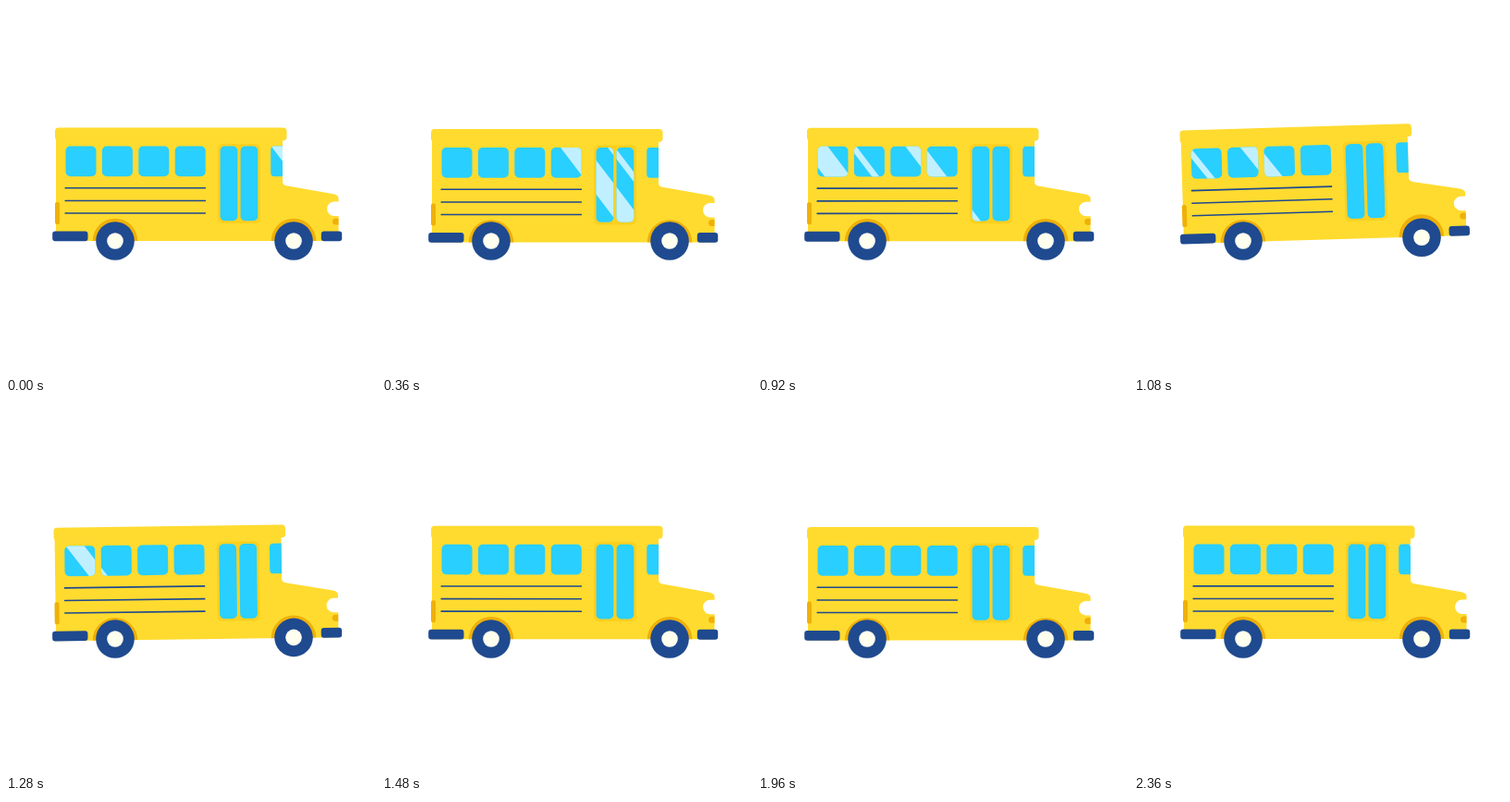
Animation of 400 by 400 pixels, one loop 2400 ms. Source, as an HTML page with a canvas:

```html
<!DOCTYPE html>
<html lang="en">
<head>
<meta charset="utf-8">
<title>School bus</title>
<style>
html, body { margin: 0; width: 100%; height: 100%; overflow: hidden; background: #fff; }
canvas { display: block; width: 400px; height: 400px; }
</style>
</head>
<body>
<canvas id="stage"></canvas>
<script>
const LOOP = 2400;
const FRAME = 40;
const COLORS = {
  body: '#ffdb2f', panel: '#fdd01f', amber: '#efb009',
  navy: '#1f4a8f', glass: '#29cfff', shine: '#c0f0ff', cream: '#fffff0'
};
const REAR = { x: 118, y: 254 };
const FRONT = { x: 311, y: 254 };
const TILT = 2 * Math.PI / 180;
const WHEEL_LIFT = 4.4;

const canvas = document.getElementById('stage');
const ctx = canvas.getContext('2d');
const scale = window.devicePixelRatio || 1;
canvas.width = canvas.height = 400 * scale;

function box(x, y, w, h, radius, color) {
  ctx.fillStyle = color;
  ctx.beginPath();
  ctx.roundRect(x, y, w, h, radius);
  ctx.fill();
}

function disc(x, y, r, color) {
  ctx.fillStyle = color;
  ctx.beginPath();
  ctx.arc(x, y, r, 0, Math.PI * 2);
  ctx.fill();
}

// Smooth rise and fall around the moment a wheel meets the bump.
function bump(t, peak) {
  const d = Math.abs(t - peak) / 240;
  return d < 1 ? (1 + Math.cos(Math.PI * d)) / 2 : 0;
}

function rotateAbout(p, angle) {
  ctx.translate(p.x, p.y);
  ctx.rotate(angle);
  ctx.translate(-p.x, -p.y);
}

function drawShell() {
  box(53, 131.5, 250.5, 14, 4, COLORS.body);
  ctx.fillStyle = COLORS.body;
  ctx.beginPath();
  ctx.moveTo(54, 144);
  ctx.lineTo(299, 144);
  ctx.lineTo(299, 190);
  ctx.quadraticCurveTo(299, 193.5, 303, 194.2);
  ctx.lineTo(354, 203.3);
  ctx.quadraticCurveTo(359.5, 204.5, 359.5, 208);
  ctx.lineTo(359.5, 254);
  ctx.lineTo(54, 254);
  ctx.closePath();
  ctx.fill();

  box(53, 212, 5, 24, [2, 2, 2, 2], COLORS.amber);
  box(353, 229.5, 6.5, 7, [3.5, 0, 0, 3.5], COLORS.amber);
  box(347, 211.5, 14, 15.5, [7.75, 0, 0, 7.75], '#fff');

  for (const y of [196.8, 210.5, 224]) box(63.5, y - 0.8, 152.5, 1.6, 0.5, COLORS.navy);
  box(229, 149, 46, 86, 5, COLORS.panel);

  for (const wheel of [REAR, FRONT]) {
    ctx.fillStyle = COLORS.amber;
    ctx.beginPath();
    ctx.arc(wheel.x, 254, 24.3, Math.PI, 0);
    ctx.fill();
  }
  box(50.2, 243.5, 38.3, 10.8, 3, COLORS.navy);
  box(340.8, 243.5, 22.4, 10.8, 3, COLORS.navy);
}

function drawGlass(t) {
  ctx.save();
  ctx.beginPath();
  for (let i = 0; i < 4; i++) ctx.roundRect(64.5 + i * 39.4, 151.5, 33, 32.7, 5);
  for (const x of [231.5, 253.5]) ctx.roundRect(x, 151.5, 18.8, 80.8, 5);
  ctx.roundRect(286.2, 151.5, 12.8, 32.7, [4, 0, 0, 4]);
  ctx.fillStyle = COLORS.glass;
  ctx.fill();
  ctx.clip();

  // Slanted reflections slide backwards across all panes.
  const time = t > 2300 ? t - LOOP : t;
  const lead = 287 - 0.26 * time;
  const top = 150, bottom = 235, slope = 0.76;
  ctx.fillStyle = COLORS.shine;
  for (const [offset, width] of [[0, 28], [51, 8], [112, 20]]) {
    const x = lead + offset;
    const xTop = x + (top - 152) * slope;
    const xBottom = x + (bottom - 152) * slope;
    ctx.beginPath();
    ctx.moveTo(xTop, top);
    ctx.lineTo(xTop + width, top);
    ctx.lineTo(xBottom + width, bottom);
    ctx.lineTo(xBottom, bottom);
    ctx.fill();
  }
  ctx.restore();
}

function drawWheel(wheel, lift) {
  disc(wheel.x, wheel.y - lift, 20.8, COLORS.navy);
  disc(wheel.x, wheel.y - lift, 8.8, COLORS.cream);
}

function draw(t) {
  const front = bump(t, 1140);
  const rear = bump(t, 1700);
  const bob = 0.75 * (1 - Math.cos(2 * Math.PI * t / 800));

  ctx.setTransform(scale, 0, 0, scale, 0, 0);
  ctx.fillStyle = '#fff';
  ctx.fillRect(0, 0, 400, 400);

  ctx.save();
  ctx.translate(0, bob);
  rotateAbout(REAR, -TILT * front);
  rotateAbout(FRONT, TILT * rear);
  drawShell();
  drawGlass(t);
  ctx.restore();

  drawWheel(REAR, WHEEL_LIFT * rear);
  drawWheel(FRONT, WHEEL_LIFT * front);
}

const start = performance.now();
function tick() {
  const elapsed = performance.now() - start;
  draw(Math.floor((elapsed % LOOP) / FRAME) * FRAME);
  requestAnimationFrame(tick);
}
tick();
</script>
</body>
</html>
```
